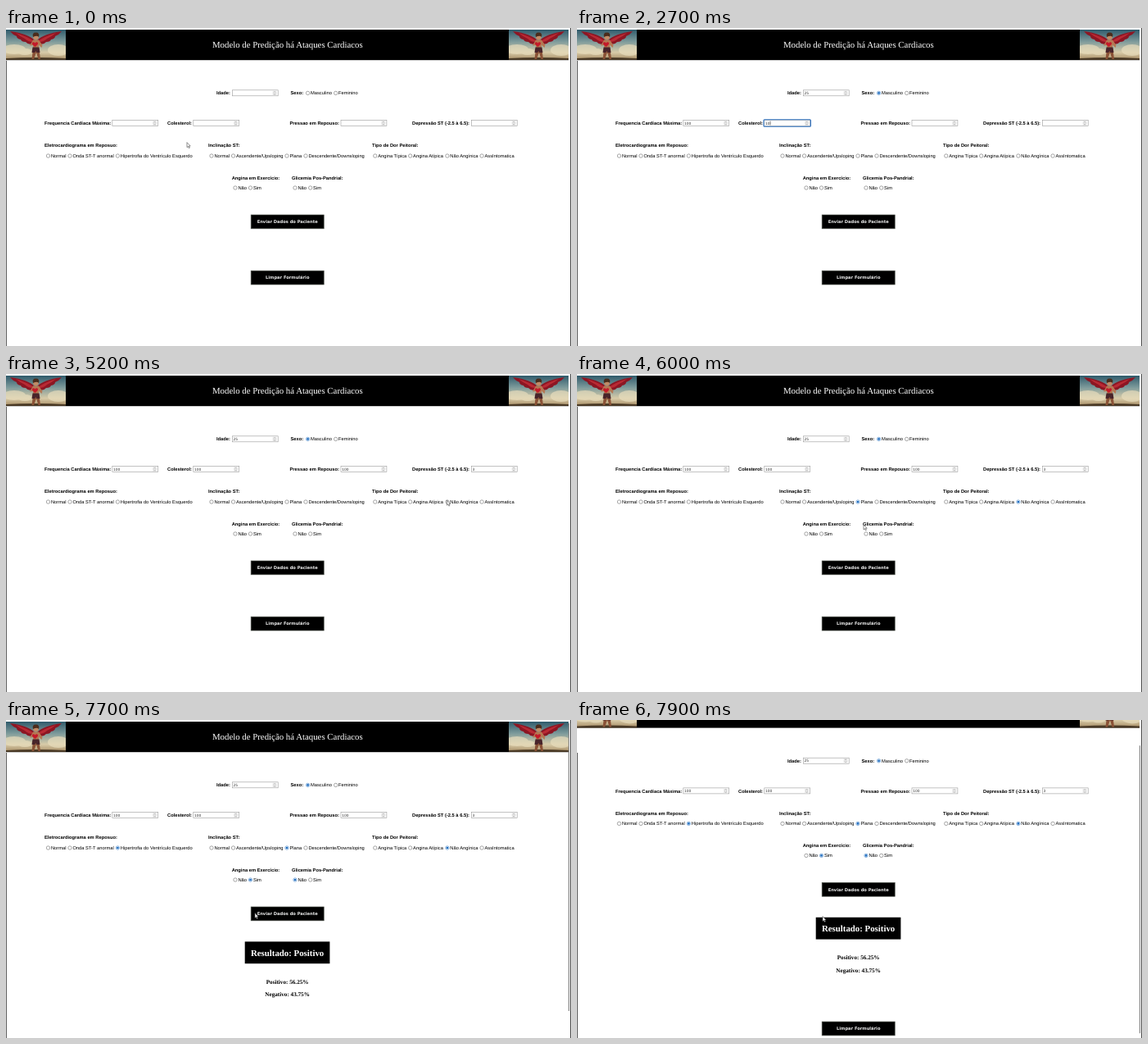
Write an HTML page that moves like this. It is 690 px wide and 388 px high and loops after 8000 ms.

```html
<!DOCTYPE html>
<html lang="pt">
<head>
<meta charset="utf-8">
<style>
html, body { margin: 0; width: 690px; height: 388px; overflow: hidden; background: #fff; }
svg { display: block; }
text { font: 5.75px "Liberation Sans", Arial, sans-serif; text-rendering: geometricPrecision; }
.label { font-weight: bold; }
.title { font: 10.84px "Liberation Serif", Times, serif; fill: #fff; text-anchor: middle; }
.bold { font-weight: bold; }
.share { font: bold 7.18px "Liberation Serif", Times, serif; text-anchor: middle; }
.button { font: bold 5.17px "DejaVu Sans", Verdana, sans-serif; fill: #eee; text-anchor: middle; }
.value { font: 4.4px "DejaVu Sans", Verdana, sans-serif; fill: #333; }
</style>
</head>
<body>
<svg id="stage" width="690" height="388" viewBox="0 0 690 388">
  <defs>
    <linearGradient id="sky" x2="0" y2="1">
      <stop stop-color="#2f5a6b"/><stop offset=".4" stop-color="#7f9c9c"/>
      <stop offset=".75" stop-color="#d8cba8"/><stop offset="1" stop-color="#a58a62"/>
    </linearGradient>
    <clipPath id="frame"><rect width="73" height="37"/></clipPath>
    <g id="cherub" clip-path="url(#frame)">
      <rect width="73" height="37" fill="url(#sky)"/>
      <g fill="#e8ddbd" opacity=".7">
        <ellipse cx="10" cy="24" rx="14" ry="6"/><ellipse cx="64" cy="25" rx="13" ry="7"/>
        <ellipse cx="23" cy="27" rx="9" ry="4"/>
      </g>
      <path d="M0 35Q36 33 73 35V37H0Z" fill="#4a3a26"/>
      <path id="wing" d="M35 13Q27 5 5 2Q8 6 13 8Q13 11 18 12Q19 15 24 15Q27 19 34 17Z" fill="#8c1623"/>
      <path id="feather" d="M34 14Q25 8 12 4Q18 9 23 11Q27 15 33 15Z" fill="#b92a34"/>
      <use href="#wing" transform="matrix(-1 0 0 1 73 0)"/>
      <use href="#feather" transform="matrix(-1 0 0 1 73 0)"/>
      <path d="M33 24L31.5 36H34L37 28L39.5 36H42L40.5 24Z" fill="#8a5236"/>
      <path d="M33 12.5H40L44.5 19L43.5 22L40 18.5V24H33V19L29 19.5Z" fill="#b57853"/>
      <path d="M32.5 21.5H40.5L41.5 28H37.5L36.5 26L35 28H31.5Z" fill="#48242a"/>
      <circle cx="36.5" cy="8.8" r="3.4" fill="#c08a66"/>
      <path d="M33 9Q31.5 3.5 36.5 3.5Q41.5 3.5 40 9Q38 6.5 33 9Z" fill="#4a2c1c"/>
      <path d="M35.5 21Q30.5 17.5 32.5 15.5Q34.5 14.5 35.5 16.5Q36.5 14.5 38.5 15.5Q40.5 17.5 35.5 21Z" fill="#c41a2a"/>
    </g>
  </defs>
  <rect width="690" height="388" fill="#fff"/>
  <g id="page"></g>
  <path d="M.4 40V388M689.5 0V388" stroke="#222" stroke-width=".8"/>
  <rect id="thumb" x="686.8" width="1.2" height="351" fill="#8a8a8a"/>
  <path id="arrow" d="M0 -.4V5.6L1.4 4.4L2.4 6.6L3.4 6.1L2.4 4H4.2Z" fill="#fff" stroke="#444" stroke-width=".6"/>
  <path id="beam" d="M-1.2 -3H1.2M0 -3V3M-1.2 3H1.2" stroke="#222" stroke-width=".6"/>
</svg>
<script>
const $ = id => document.getElementById(id);
const page = $('page');

function add(tag, attrs, parent = page, content = '') {
  const el = document.createElementNS('http://www.w3.org/2000/svg', tag);
  for (const k in attrs) el.setAttribute(k, attrs[k]);
  el.textContent = content;
  return parent.appendChild(el);
}
const text = (x, y, str, cls = '', parent = page) => add('text', { x, y, class: cls }, parent, str);
const show = (el, on) => el.style.display = on ? '' : 'none';

// Header
add('rect', { y: 2, width: 687, height: 37.2 });
for (const x of [0, 614]) add('use', { href: '#cherub', x, y: 2 });
text(343.8, 24.3, 'Modelo de Predição há Ataques Cardiacos', 'title');

// Labels
[
  [257, 81.2, 'Idade:'], [347.5, 81.2, 'Sexo:'],
  [47, 118.2, 'Frequencia Cardíaca Máxima:'], [197, 118.2, 'Colesterol:'],
  [346.5, 118.2, 'Pressao em Repouso:'], [496, 118.2, 'Depressão ST (-2.5 à 6.5):'],
  [47, 145.3, 'Eletrocardiograma em Reposuo:'], [247, 145.3, 'Inclinação ST:'],
  [447, 145.3, 'Tipo de Dor Peitoral:'],
  [275.7, 184.6, 'Angina em Exercício:'], [349, 184.6, 'Glicemia Pos-Pandrial:']
].forEach(([x, y, s]) => text(x, y, s, 'label'));

// Number fields: x, y, value, focus time, typing time, blur time
const fields = [
  [276, 75.5, '25', 500, 600, 1200],
  [129.5, 112.2, '100', 1900, 2000, 2500],
  [228.5, 112.2, '100', 2500, 2600, 3400],
  [408.7, 112.2, '100', 3400, 3700, 4400],
  [568, 112.2, '3', 4400, 4600, 5200]
].map(([x, y, value, focus, type, blur]) => {
  const ring = add('rect', { x: x - .5, y: y - .5, width: 57.4, height: 8.6, rx: 1, fill: 'none', stroke: '#2a6fc0', 'stroke-width': 1.1 });
  add('rect', { x: x + .3, y: y + .3, width: 55.9, height: 7, fill: '#fff', stroke: '#9a9a9a', 'stroke-width': .6 });
  add('rect', { x: x + 49.6, y: y + 1.1, width: 5, height: 5.5, fill: '#e9e9e9' });
  add('path', { d: `M${x + 51} ${y + 3.1}l1.1 -1.2l1.1 1.2M${x + 51} ${y + 4.7}l1.1 1.2l1.1 -1.2`, fill: 'none', stroke: '#888', 'stroke-width': .5 });
  page.append(ring);
  const caret = add('rect', { y: y + 1.4, width: .5, height: 4.9 });
  return { x, y, value, focus, type, blur, ring, caret, label: text(x + 1.5, y + 5.5, '', 'value') };
});

// Radio buttons: x, y, label, time of selection
const radios = [
  [368.6, 79.4, 'Masculino', 1200], [402.7, 79.4, 'Feminino'],
  [51.5, 156, 'Normal'], [78, 156, 'Onda ST-T anormal'],
  [136.4, 156, 'Hipertrofia do Ventrículo Esquerdo', 6700],
  [251, 156, 'Normal'], [277.6, 156, 'Ascendente/Upsloping'],
  [343, 156, 'Plana', 5700], [366, 156, 'Descendente/Downsloping'],
  [450.8, 156, 'Angina Típica'], [493.7, 156, 'Angina Atípica'],
  [538.9, 156, 'Não Angínica', 5300], [581.1, 156, 'AssIntomatica'],
  [280, 195, 'Não'], [298.5, 195, 'Sim', 6500],
  [353, 195, 'Não', 6200], [371.7, 195, 'Sim']
].map(([cx, cy, label, on = Infinity]) => {
  const ring = add('circle', { cx, cy, r: 2.2, fill: '#fff', 'stroke-width': .6 });
  const dot = add('circle', { cx, cy, r: 1.35, fill: '#1f6dc0' });
  text(cx + 3.4, cy + 2, label);
  return { ring, dot, on };
});

function button(y, label) {
  const g = add('g', {});
  add('rect', { x: 299.2, y, width: 89, height: 16.8, stroke: '#454a42', 'stroke-width': .7 }, g);
  text(343.7, y + 10.2, label, 'button', g);
  return g;
}
button(228, 'Enviar Dados do Paciente');
const clear = button(296.2, 'Limpar Formulário');

const result = add('g', {});
add('rect', { x: 291.7, y: 270.4, width: 103.7, height: 26.8 }, result);
text(343.6, 287.5, 'Resultado: Positivo', 'title bold', result);
text(343.6, 321.8, 'Positivo: 56.25%', 'share', result);
text(343.6, 337.3, 'Negativo: 43.75%', 'share', result);

// Pointer path: time, x, y
const path = [
  [0, 221, 140], [300, 262, 104], [500, 300, 79], [800, 300, 79],
  [1100, 368, 79], [1200, 368, 79], [1600, 139, 121], [1700, 148, 117], [2200, 148, 116],
  [2500, 250, 116], [2800, 250, 116], [3400, 432, 116], [4000, 432, 116],
  [4400, 592, 116], [4600, 592, 116], [4900, 562, 172], [5200, 538.5, 154.5], [5300, 538.5, 154.5],
  [5400, 385, 186], [5600, 342.5, 155], [5700, 342.5, 155], [6100, 352.5, 194], [6200, 352.5, 194],
  [6400, 298, 194], [6500, 298, 194], [6700, 136, 155], [6900, 221, 190.5],
  [7100, 286, 256], [7200, 304, 236], [7800, 304, 236], [7900, 300, 240]
];
function pointerAt(t) {
  const i = path.findIndex(p => p[0] > t);
  if (i < 0) return path.at(-1).slice(1);
  const [a, b] = [path[i - 1], path[i]];
  const k = (t - a[0]) / (b[0] - a[0]);
  return [1, 2].map(n => a[n] + (b[n] - a[n]) * k);
}

function render(t) {
  let hidden = false, overField = false;
  const [px, py] = pointerAt(t);

  for (const f of fields) {
    const count = Math.max(0, Math.min(f.value.length, (t - f.type) / 100 + 1));
    const focused = t >= f.focus && t < f.blur;
    f.label.textContent = f.value.slice(0, count);
    show(f.ring, focused);
    show(f.caret, focused && t !== f.type - 200);
    f.caret.setAttribute('x', f.x + 1.7 + count * 2.8);
    if (px > f.x && px < f.x + 56 && py > f.y && py < f.y + 8) {
      overField = true;
      hidden = focused;
    }
  }
  for (const r of radios) {
    show(r.dot, t >= r.on);
    r.ring.setAttribute('stroke', t >= r.on ? '#3f82c8' : '#6c6c6c');
  }

  const done = t >= 7500;
  const scroll = t >= 7900 ? 29.6 : t >= 7800 ? 12 : 0;
  show(result, done);
  show($('thumb'), done);
  $('thumb').setAttribute('y', 4 + scroll * .92);
  clear.setAttribute('transform', `translate(0 ${done ? 101.5 : 0})`);
  page.setAttribute('transform', `translate(0 ${-scroll})`);

  show($('arrow'), !overField);
  show($('beam'), overField && !hidden);
  for (const id of ['arrow', 'beam']) $(id).setAttribute('transform', `translate(${px} ${py})`);
}

const start = performance.now();
function tick() {
  const t = Math.max(0, performance.now() - start) % 8000;
  render(Math.floor(t / 100) * 100);
  requestAnimationFrame(tick);
}
tick();
</script>
</body>
</html>
```
